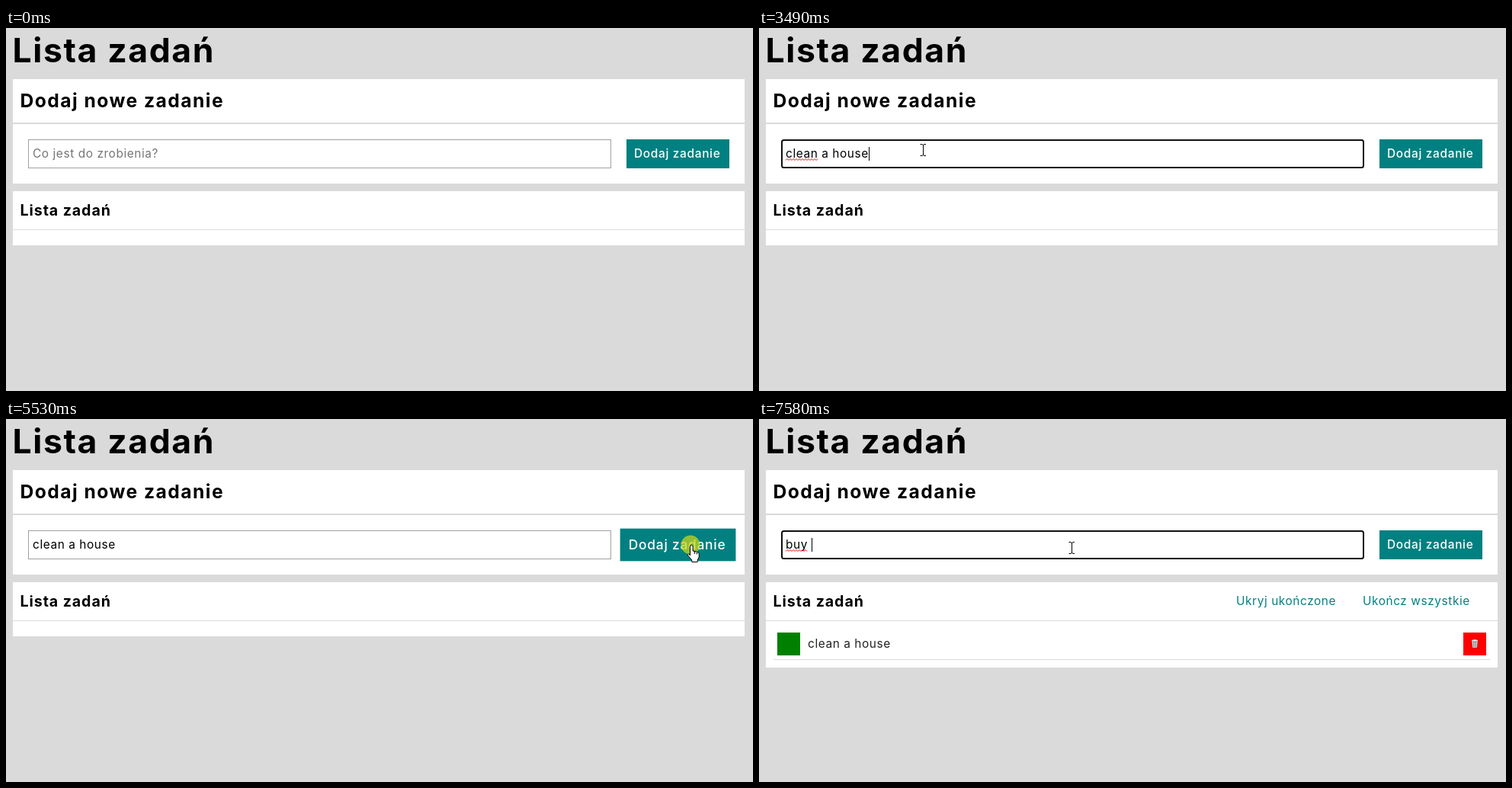
These frames come from a looping animation (980 by 476 pixels, 8000 ms). An HTML page:

```html
<!DOCTYPE html>
<html lang="pl">
<head>
<meta charset="utf-8">
<title>Lista zadań</title>
<style>
  html, body { margin: 0; width: 100%; height: 100%; overflow: hidden; background: #dadada; }
  svg { display: block; width: 980px; height: 476px; }
  text {
    font: 400 15.4px Inter, "Open Sans", sans-serif;
    font-optical-sizing: none;
    letter-spacing: .038em;
    white-space: pre;
  }
  .h1 { font-size: 44.5px; font-weight: 700; letter-spacing: .036em; }
  .h2 { font-size: 24.6px; font-weight: 700; letter-spacing: .06em; }
  .h3 { font-size: 19.6px; font-weight: 700; letter-spacing: .047em; }
  .link { fill: #008080; }
  .label { fill: #fff; font-weight: 500; letter-spacing: .045em; }
  .shape { fill: #fff; stroke: #000; stroke-linejoin: round; }
</style>
</head>
<body>
<svg viewBox="0 0 980 476">
  <rect width="980" height="476" fill="#dadada"/>
  <text class="h1" x="8.5" y="45">Lista zadań</text>

  <rect x="9" y="67" width="960" height="137" fill="#fff"/>
  <rect x="9" y="124" width="960" height="2" fill="#dadada"/>
  <text class="h2" x="18.5" y="104">Dodaj nowe zadanie</text>

  <rect id="blurred" x="29.5" y="146.5" width="764" height="37" fill="#fff" stroke="#a0a0a0"/>
  <rect id="focused" x="30" y="147" width="763" height="36" rx="2.5" fill="#fff" stroke="#101010" stroke-width="2"/>
  <text id="hint" x="35" y="170" fill="#757575">Co jest do zrobienia?</text>
  <text id="typed" x="35" y="170"></text>
  <path id="waves" fill="none" stroke="#f00"/>
  <rect id="caret" y="156" width="1" height="18"/>

  <rect id="panel" x="9" y="214" width="960" height="71" fill="#fff"/>
  <rect x="9" y="264" width="960" height="1" fill="#dadada"/>
  <text class="h3" x="18.5" y="245.5">Lista zadań</text>
  <g id="task">
    <text class="link" x="626" y="244">Ukryj ukończone</text>
    <text class="link" x="792" y="244">Ukończ wszystkie</text>
    <rect x="24" y="280" width="30" height="30" fill="#008000"/>
    <text x="64" y="300" fill="#222">clean a house</text>
    <rect x="924" y="280" width="30" height="30" fill="#f00"/>
    <path d="M935 291h8l-1 9h-6z" fill="#ddd" stroke="#6a3030" stroke-width=".5"/>
    <path d="M937.5 292v7m1.5-7v7m1.5-7v7" stroke="#777" stroke-width=".7"/>
    <ellipse cx="939" cy="290.5" rx="4.2" ry="1.6" fill="#eee" stroke="#6a3030" stroke-width=".5"/>
    <rect x="19" y="315" width="940" height="1" fill="#dadada"/>
  </g>

  <g id="button">
    <rect x="814" y="146" width="135" height="38" fill="#008080"/>
    <text class="label" x="824" y="170">Dodaj zadanie</text>
  </g>

  <circle id="click" cx="898" cy="165" r="12.5" fill="#c4d41c" opacity=".75"/>
  <g id="mouse">
    <path id="arrow" class="shape" d="M.5 .5V16.5L4.2 13 6.7 18.7 9.2 17.6 6.8 12H11.7Z"/>
    <path id="beam" fill="none" stroke="#000" d="M-3.5 -7.5H-1L.5 -6.5 2 -7.5H4M-3.5 7.5H-1L.5 6.5 2 7.5H4M.5 -7V7"/>
    <path id="hand" class="shape" d="M-1.5 14V2a1.8 1.8 0 0 1 3.6 0V8l5.5 1.2q2.6 .6 2.6 3V16l-2 4V22.5H.8V20L-4.2 14.2q-.8-2 .8-2.4 1 0 1.9 2.2M4.6 9v3M7.4 10v2.5"/>
  </g>
</svg>
<script>
const LOOP = 8000;
const el = id => document.getElementById(id);
const show = (id, on) => el(id).setAttribute('visibility', on ? 'visible' : 'hidden');

const FOCUS = 750, PRESS = 5400, ADDED = 5650;
const entries = [
  { from: FOCUS, text: 'clean a house',
    keys: [1310, 1640, 1780, 2040, 2170, 2310, 2510, 2570, 2900, 2970, 3170, 3230, 3490] },
  { from: ADDED, text: 'buy ', keys: [7050, 7190, 7450, 7580] }
];
// misspelt words: time shown, time hidden, first and end character
const errors = [[2310, PRESS, 0, 5], [4280, PRESS, 8, 13], [7580, LOOP, 0, 3]];

// pointer path: time, x, y
const path = [
  [120, 250, 402], [300, 246, 300], [520, 225, 185], [780, 215, 160],
  [4220, 215, 160], [4340, 400, 130], [4480, 800, 116], [4560, 965, 150],
  [4680, 892, 196], [4740, 894, 186], [4860, 898, 172], [5070, 899, 165],
  [5660, 899, 165], [5720, 790, 176], [5800, 540, 186], [5930, 430, 177],
  [6060, 410, 169], [LOOP, 410, 169]
];

// the CSS "ease" curve
function ease(x) {
  if (x <= 0) return 0;
  if (x >= 1) return 1;
  let lo = 0, hi = 1, u = .5;
  for (let i = 0; i < 20; i++) {
    u = (lo + hi) / 2;
    if (.75 * u * (1 - u) + u ** 3 < x) lo = u; else hi = u;
  }
  return .3 * u * (1 - u) ** 2 + 3 * u * u * (1 - u) + u ** 3;
}

function pointerAt(t) {
  const i = Math.max(1, path.findIndex(p => p[0] > t));
  const [t0, x0, y0] = path[i - 1], [t1, x1, y1] = path[i];
  const k = Math.max(0, (t - t0) / (t1 - t0));
  return [Math.round(x0 + (x1 - x0) * k), Math.round(y0 + (y1 - y0) * k)];
}

function wave(a, b) {
  let d = `M${a} 173.5`;
  for (let x = a + 2, up = true; x <= b; x += 2, up = !up) d += `L${x} ${up ? 171.5 : 173.5}`;
  return d;
}

function drawInput(t) {
  const entry = entries[t < ADDED ? 0 : 1];
  const count = entry.keys.filter(k => k <= t).length;
  const typed = el('typed');
  const text = entry.text.slice(0, count);
  if (typed.textContent !== text) typed.textContent = text;
  const xAt = n => 35 + (n ? typed.getSubStringLength(0, n) : 0);

  const focus = t >= FOCUS && t < PRESS || t >= ADDED;
  show('focused', focus);
  show('blurred', !focus);
  show('hint', !count);

  const last = count ? entry.keys[count - 1] : entry.from;
  show('caret', focus && (t - last) % 1000 < 500);
  el('caret').setAttribute('x', Math.round(xAt(count)));
  el('waves').setAttribute('d', errors
    .filter(([on, off]) => t >= on && t < off)
    .map(([, , a, b]) => wave(Math.round(xAt(a)), xAt(b))).join(''));
}

function drawMouse(t) {
  const [x, y] = pointerAt(t);
  const inRow = y >= 146 && y < 184;
  const beam = inRow && x >= 29 && x < 794, hand = inRow && x >= 814 && x < 949;
  const on = t >= 120;
  el('mouse').setAttribute('transform', `translate(${x} ${y})`);
  show('beam', on && beam);
  show('hand', on && hand);
  show('arrow', on && !beam && !hand);
  show('click', t >= PRESS && t < ADDED);
}

function draw(t) {
  drawInput(t);
  drawMouse(t);
  show('task', t >= ADDED);
  el('panel').setAttribute('height', t >= ADDED ? 112 : 71);
  const grow = 1 + .128 * (ease((t - 4750) / 1000) - ease((t - 5710) / 1000));
  el('button').setAttribute('transform',
    `translate(881.5 165) scale(${grow}) translate(-881.5 -165)`);
}

let start;
function tick(now) {
  start ??= now;
  draw((now - start) % LOOP);
  requestAnimationFrame(tick);
}
draw(0);
requestAnimationFrame(tick);
</script>
</body>
</html>
```
